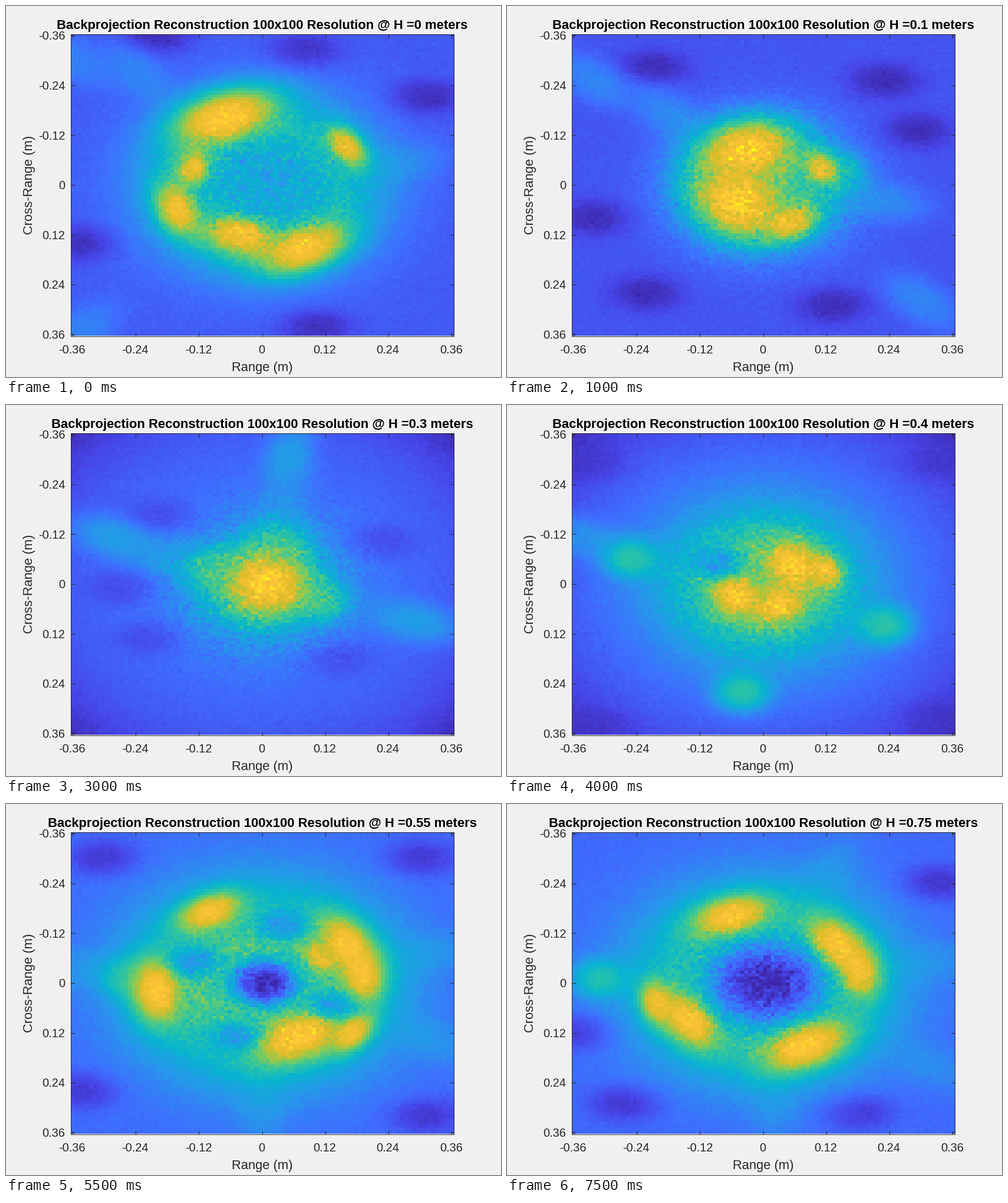
Recreate the animation shown at these times as a matplotlib script. Size 840 by 630 pixels, loop 8000 ms.

```python
import numpy as np
import matplotlib.pyplot as plt
from matplotlib.animation import FuncAnimation
from matplotlib.colors import LinearSegmentedColormap

W, H, DPI = 840, 630, 144
LEFT, RIGHT, TOP, BOTTOM = 109.5, 759.5, 47.5, 560.5
INK = "#262626"
FRAMES, STEP = 16, 0.05
LIM = 0.36 * 100 / 99

plt.rcParams["font.family"] = "Liberation Sans"

parula = LinearSegmentedColormap.from_list("parula", [
    "#3e26a8", "#4747eb", "#3e6fff", "#2797eb", "#08b5d0",
    "#31c69f", "#81cc59", "#dcbd29", "#fec338", "#f9fb15"])

# Positions are in centimetres, y pointing down.
axis = np.linspace(-36, 36, 100)
X, Y = np.meshgrid(axis, axis)
R = np.hypot(X, Y)


def blend(field, x, y, spot, rx, ry, level, angle=0.0):
    """Pull the field towards a level inside one soft ellipse."""
    dx, dy = x - spot[0], y - spot[1]
    u = (dx * np.cos(angle) + dy * np.sin(angle)) / rx
    v = (dy * np.cos(angle) - dx * np.sin(angle)) / ry
    field += (level - field) * np.exp(-np.hypot(u, v) ** 2.6)


class Slice:
    """Scene at one height: nested discs, a hole and soft spots."""

    def __init__(self, height, base, discs, hot, dark, light,
                 teal=(), cool=(), hole=None, vignette=0):
        self.height, self.base, self.discs = height, base, discs
        self.hot, self.dark, self.light = hot, dark, light
        self.teal, self.cool, self.hole = teal, cool, hole
        self.vignette = vignette
        self.radius = discs[-1]

    def paint(self, x, y):
        f = self.base - self.vignette * (np.hypot(x, y) / 45) ** 4
        for p in self.dark:
            blend(f, x, y, p, 7, 4.5, 0.07)
        for p in self.light:
            blend(f, x, y, p, 9, 5, 0.30, np.arctan2(p[1], p[0]))
        for r, level in zip(self.discs, (0.34, 0.48, 0.57)):
            blend(f, x, y, (0, 0), r, r * 0.95, level)
        for p in self.teal:
            blend(f, x, y, p, 5.5, 5, 0.5)
        for p in self.hot:
            self.ridge(f, x, y, p, 1.55, 0.65)
        if self.hole:
            r, level = self.hole
            blend(f, x, y, (0.5, 0), r * 1.25, r * 1.15, 0.42)
            blend(f, x, y, (0.5, 0), r, r * 0.9, level)
        for p in self.cool:
            blend(f, x, y, p, 5, 3.8, 0.34)
        for p in self.hot:
            self.ridge(f, x, y, p, 1, 0.74 + 0.016 * p[2])
        return f

    @staticmethod
    def ridge(f, x, y, p, grow, level):
        # Far spots stretch along the ring, near ones stay round.
        thin = 1 - 0.4 * min(np.hypot(p[0], p[1]) / 15, 1)
        angle = np.arctan2(p[1], p[0]) + np.pi / 2
        blend(f, x, y, p, p[2] * grow, p[2] * grow * thin, level, angle)


slices = [
    Slice(0, 0.20, (25, 21, 18),
          hot=[(-7, -16, 8), (16, -9, 4), (-13, -4, 4), (-16, 6, 5),
               (-4, 12, 6), (8, 15, 7)],
          dark=[(-20, -36), (8, -32), (31, -21), (-34, 14), (10, 34)],
          light=[(-36, -30), (-34, 35), (26, -5), (-24, -27)],
          hole=(10, 0.41)),
    Slice(0.1, 0.18, (19, 15, 11),
          hot=[(-3, -8, 7), (-5, 4, 7), (11, -4, 3), (5, 9, 4)],
          dark=[(-21, -28), (23, -25), (29, -13), (-32, 8), (13, 29), (-22, 26)],
          light=[(-32, -25), (-18, -17), (23, 4), (30, 28)],
          teal=[(14, -3)]),
    Slice(0.2, 0.17, (15, 12, 10),
          hot=[(0, 0, 7.3)],
          dark=[(-13, -27), (15, -25), (27, -8), (-29, 0), (-22, 19), (7, 24)],
          light=[(-30, -18), (18, 2), (-16, -9), (6, -14), (34, 4)],
          vignette=0.1),
    Slice(0.3, 0.17, (18, 10, 8),
          hot=[(1, 0, 5.5)],
          dark=[(-19, -16), (22, -10), (-21, 13), (14, 18), (-26, 1)],
          light=[(-28, -11), (-15, -5), (29, 9), (3, -13), (5, -30)],
          teal=[(-9, -3), (11, 4), (3, -9)],
          vignette=0.11),
    Slice(0.4, 0.18, (30, 18, 14),
          hot=[(6, -4, 5), (3, 5, 4), (-5, 3, 4), (12, -3, 3)],
          dark=[(-33, -29), (33, -29), (-32, 34), (33, 32)],
          light=[(-34, -11)],
          teal=[(-25, -6), (23, 10), (-4, 26)],
          cool=[(-9, -5)],
          vignette=0.08),
    Slice(0.55, 0.21, (28, 24, 21),
          hot=[(16, -9, 6), (11, -6, 3), (19, -2, 5), (-20, 2, 6),
               (7, 13, 7), (17, 12, 4), (-10, -17, 5)],
          dark=[(-30, -30), (30, -30), (-34, 26), (31, 32)],
          light=[(-33, -3), (31, -7), (33, 14), (0, 30)],
          teal=[(-25, -1)],
          cool=[(-13, -5), (4, -14), (-5, 13), (13, 6)],
          hole=(5.5, 0.04)),
    Slice(0.75, 0.22, (28, 24, 20),
          hot=[(14, -9, 6), (18, -3, 5), (8, 15, 7), (-14, 9, 6),
               (-6, -16, 6), (-20, 5, 4)],
          dark=[(33, -24), (-35, 12), (-26, 29), (18, 31)],
          light=[(32, -5), (32, 20), (2, 29), (13, -27)],
          teal=[(-31, -1)],
          hole=(10, 0.06)),
]


def field_at(i):
    h = i * STEP
    k = min(sum(h >= s.height - 1e-9 for s in slices), len(slices) - 1)
    a, b = slices[k - 1], slices[k]
    t = (h - a.height) / (b.height - a.height)
    radius = a.radius + (b.radius - a.radius) * t
    field = 0
    for weight, s in ((1 - t, a), (t, b)):
        if weight > 1e-6:
            zoom = 1 + (s.radius / radius - 1) * np.exp(-(R / 22) ** 2)
            field = field + weight * s.paint(X * zoom, Y * zoom)
    field = np.interp(field, (field.min(), field.max()), (0.03, 0.9))
    # Speckle grows towards the middle of the scene.
    grain = 0.008 + 0.035 * np.exp(-(R / 19) ** 4)
    rng = np.random.default_rng(40 + i)
    return np.clip(field + grain * rng.standard_normal(R.shape), 0, 1)


fig = plt.figure(figsize=(W / DPI, H / DPI), dpi=DPI, facecolor="#f0f0f0")
ax = fig.add_axes([LEFT / W, 1 - BOTTOM / H, (RIGHT - LEFT) / W, (BOTTOM - TOP) / H])
image = ax.imshow(np.zeros(R.shape), cmap=parula, vmin=0, vmax=1, aspect="auto",
                  interpolation="nearest", extent=(-LIM, LIM, LIM, -LIM))


def label(x, y, text, size, ha="center", **style):
    style = {"color": INK, **style}
    return fig.text(x / W, 1 - y / H, text, fontsize=size, ha=ha, va="baseline",
                    rotation_mode="anchor", **style)


ticks = np.arange(-3, 4) * 0.12
ax.set_xticks(ticks)
ax.set_yticks(ticks)
ax.tick_params(direction="in", length=3.25, width=0.5, color=INK, top=True,
               right=True, labelbottom=False, labelleft=False)
for spine in ax.spines.values():
    spine.set(linewidth=0.5, color=INK)

for v in ticks:
    part = (v + LIM) / (2 * LIM)
    name = f"{v:.2g}"
    label(LEFT + part * (RIGHT - LEFT) - 0.8, 590, name, 10)
    label(100.5, TOP + part * (BOTTOM - TOP) + 7.2, name, 10, "right")

label(435, 620, "Range (m)", 11)
label(45, 304, "Cross-Range (m)", 11, rotation=90)
title = label(435, 39, "", 11, color="black", weight="bold")


def update(i):
    image.set_data(field_at(i))
    title.set_text("Backprojection Reconstruction 100x100 Resolution "
                   f"@ H ={round(i * STEP, 2):g} meters")
    return image, title


anim = FuncAnimation(fig, update, frames=FRAMES, interval=500, repeat=True,
                     repeat_delay=0, blit=False)
plt.show()
```
